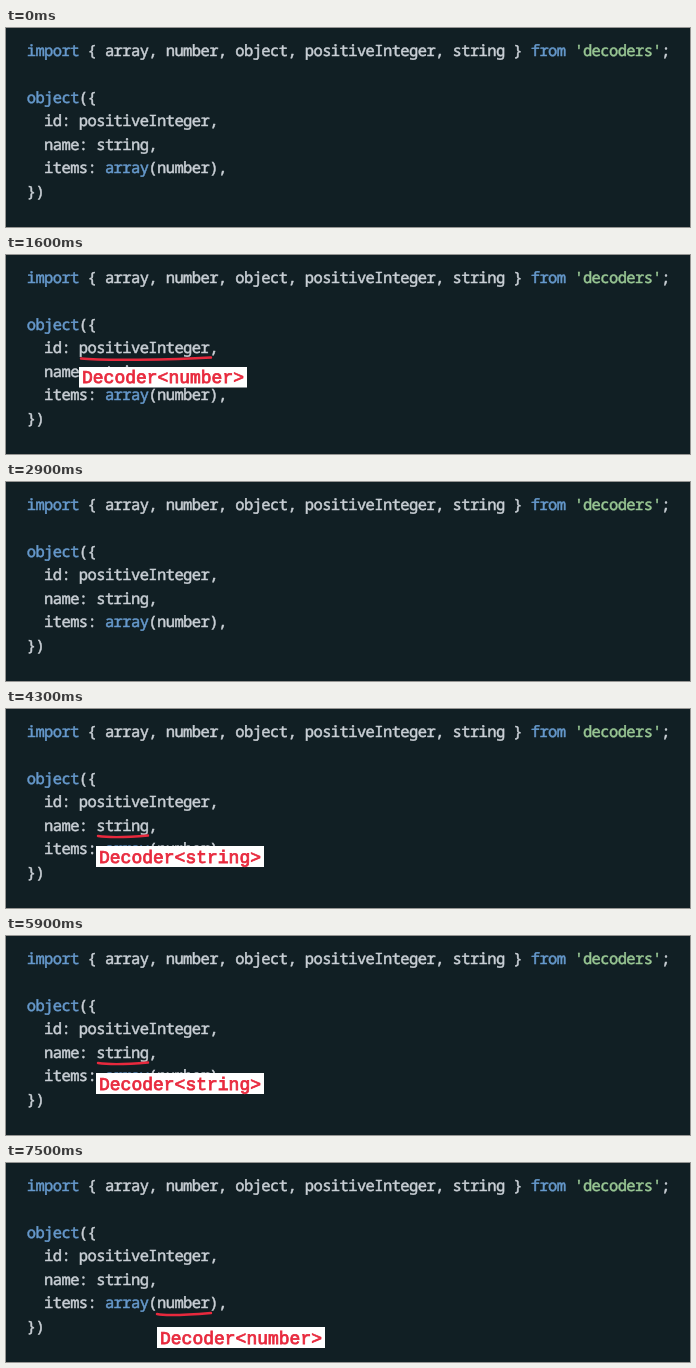
An HTML page for the animation above (8 s loop, 684 by 199 pixels).

```html
<!DOCTYPE html>
<html lang="en">
<head>
<meta charset="utf-8">
<title>Decoder types</title>
<style>
  html, body { margin: 0; width: 100%; height: 100%; overflow: hidden; background: #111f24; }
  svg { display: block; }
  text { white-space: pre; text-rendering: geometricPrecision; }
  .code {
    font: 15.5px "Noto Sans Mono", monospace;
    letter-spacing: -.61px;
    fill: #c9cfd5;
    stroke: #c9cfd5;
    stroke-width: .5;
  }
  .blue { fill: #6699cc; stroke: #6699cc; }
  .green { fill: #99c794; stroke: #99c794; }
  .note { visibility: hidden; }
  .note path { fill: none; stroke: #e8293d; stroke-width: 2.4; stroke-linecap: round; }
  .note rect { fill: #fff; }
  .note text {
    font: 18px "Liberation Mono", monospace;
    fill: #e8293d;
    stroke: #e8293d;
    stroke-width: .8;
  }
</style>
</head>
<body>
<svg width="684" height="199" viewBox="0 0 684 199">
  <g class="code">
    <text x="20.7" y="28"><tspan class="blue">import</tspan> { array, number, object, positiveInteger, string } <tspan class="blue">from</tspan> <tspan class="green">'decoders'</tspan>;</text>
    <text x="20.7" y="75"><tspan class="blue">object</tspan>({</text>
    <text x="20.7" y="98.4">  id: positiveInteger,</text>
    <text x="20.7" y="121.8">  name: string,</text>
    <text x="20.7" y="145.2">  items: <tspan class="blue">array</tspan>(number),</text>
    <text x="20.7" y="168.6">})</text>
  </g>
  <g class="note">
    <path d="M75 103.5C95 105.5 165 105 205 102.5"/>
    <rect x="73" y="112" width="168" height="20.5"/>
    <text x="76" y="128">Decoder&lt;number&gt;</text>
  </g>
  <g class="note">
    <path d="M92 127C105 129 125 128 142 126.5"/>
    <rect x="90" y="137" width="168" height="21"/>
    <text x="93" y="153.5">Decoder&lt;string&gt;</text>
  </g>
  <g class="note">
    <path d="M151 151C160 153 180 152 205 150"/>
    <rect x="151" y="164" width="168" height="21"/>
    <text x="154" y="180.5">Decoder&lt;number&gt;</text>
  </g>
</svg>
<script>
  const LOOP = 8000;
  const shownDuring = [[400, 2900], [3400, 6000], [6300, LOOP]];
  const notes = document.querySelectorAll('.note');
  const start = performance.now();

  function draw() {
    const t = (performance.now() - start) % LOOP;
    notes.forEach((note, i) => {
      const [from, to] = shownDuring[i];
      note.style.visibility = t >= from && t < to ? 'visible' : 'hidden';
    });
    requestAnimationFrame(draw);
  }
  draw();
</script>
</body>
</html>
```
